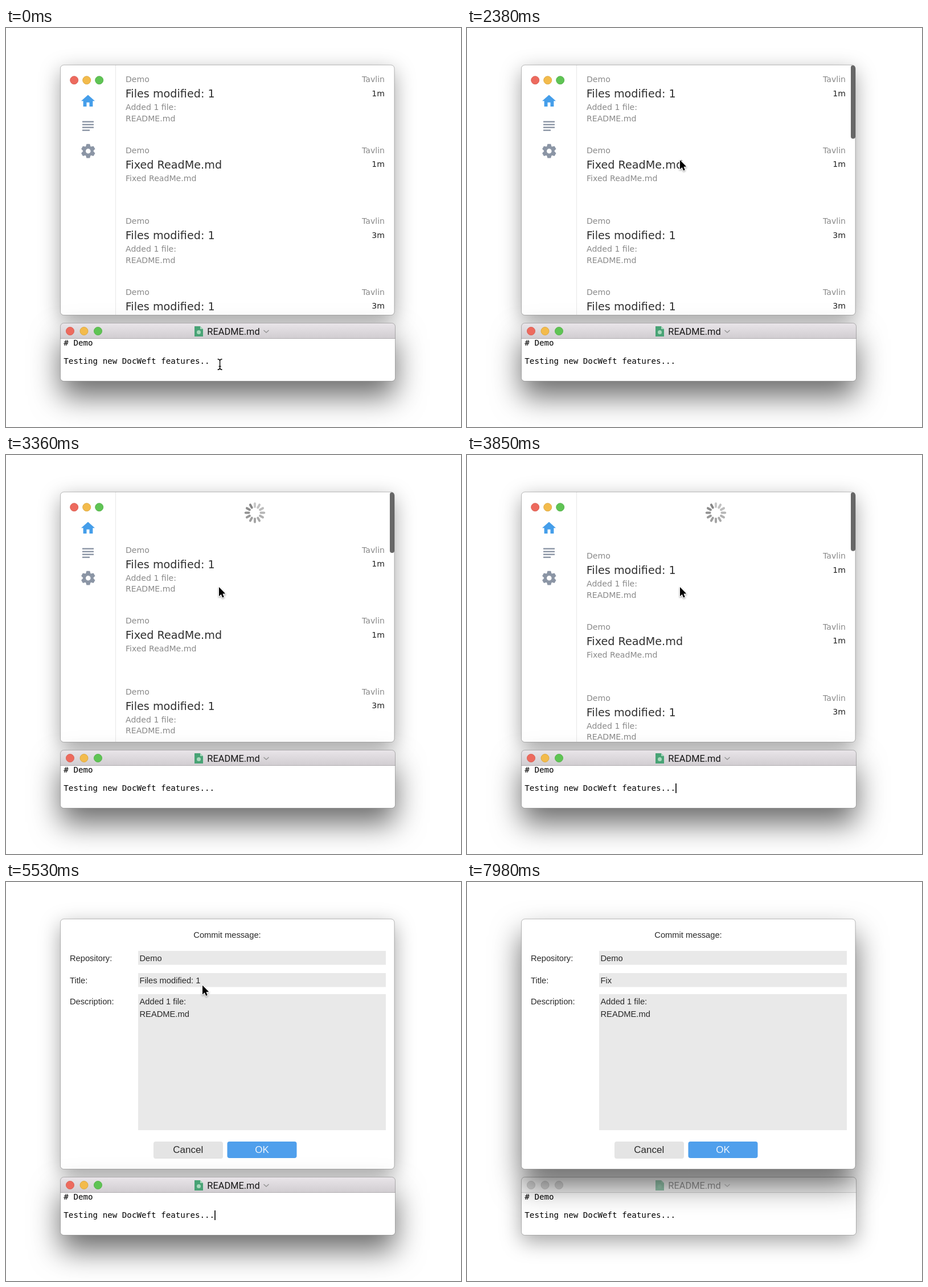
Write an HTML page with a canvas that moves like this. It is 799 px wide and 701 px high and loops after 8 s.

```html
<!DOCTYPE html>
<html lang="en">
<head>
<meta charset="utf-8">
<title>Commit dialog demo</title>
<style>
  html, body { margin: 0; width: 100%; height: 100%; overflow: hidden; background: #fff; }
  canvas { display: block; }
</style>
</head>
<body>
<canvas id="stage" width="799" height="701"></canvas>
<script>
const ctx = document.getElementById('stage').getContext('2d');
const LOOP = 8000, STEP = 70;
const LIST = '"DejaVu Sans", sans-serif';
const FORM = '"Liberation Sans", Arial, sans-serif';
const MONO = '14.2px "DejaVu Sans Mono", monospace';
const AUTHOR = 'Tavlin';

const ROWS = [
  ['Files modified: 1', ['Added 1 file:', 'README.md'], '1m'],
  ['Fixed ReadMe.md', ['Fixed ReadMe.md'], '1m'],
  ['Files modified: 1', ['Added 1 file:', 'README.md'], '3m'],
  ['Files modified: 1', ['Added 1 file:', 'README.md'], '3m']
];

// Key times in ms
const T = {
  type: 350, move: 840, moveEnd: 1610, bar: 2240, pull: 2450, pullEnd: 3850,
  dialog: 4340, aim: 5320, aimEnd: 5530, nudge: 5810, blur: 6090, select: 6440
};
const TITLE_KEYS = [[7350, 'F'], [7560, 'Fi'], [7770, 'Fix']];

const clamp = v => Math.max(0, Math.min(1, v));
const span = (t, a, b) => clamp((t - a) / (b - a));
const lerp = (a, b, u) => a + (b - a) * u;
const smooth = u => u * u * (3 - 2 * u);
const easeOut = u => 1 - (1 - u) * (1 - u);

function text(s, x, y, font, color, align = 'left') {
  ctx.font = font;
  ctx.fillStyle = color;
  ctx.textAlign = align;
  ctx.fillText(s, x, y);
}

function box(x, y, w, h, r) {
  ctx.beginPath();
  ctx.roundRect(x, y, w, h, r);
}

function fillBox(x, y, w, h, r, color) {
  box(x, y, w, h, r);
  ctx.fillStyle = color;
  ctx.fill();
}

function poly(points) {
  ctx.beginPath();
  points.forEach(([x, y]) => ctx.lineTo(x, y));
  ctx.closePath();
}

// Window frame with shadow; content is clipped to the rounded corners
function frame(x, y, w, h, active, content) {
  ctx.save();
  ctx.shadowColor = active ? 'rgba(0,0,0,.58)' : 'rgba(0,0,0,.37)';
  ctx.shadowBlur = active ? 51 : 36;
  ctx.shadowOffsetY = active ? 27 : 11;
  fillBox(x, y, w, h, 6, '#fff');
  ctx.restore();

  ctx.save();
  box(x, y, w, h, 6);
  ctx.clip();
  content();
  ctx.restore();

  box(x, y, w, h, 6);
  ctx.strokeStyle = 'rgba(0,0,0,.26)';
  ctx.lineWidth = 1;
  ctx.stroke();
}

function lights(x, y, gap, active) {
  const colors = active
    ? [['#ed6a5e', '#d8584c'], ['#f3bb4c', '#dba63c'], ['#5fc454', '#4eae43']]
    : Array(3).fill(['#d6d6d6', '#c4c4c4']);
  colors.forEach(([fill, edge], i) => {
    ctx.beginPath();
    ctx.arc(x + i * gap, y, 7, 0, 7);
    ctx.fillStyle = fill;
    ctx.fill();
    ctx.strokeStyle = edge;
    ctx.lineWidth = 0.9;
    ctx.stroke();
  });
}

function sidebar() {
  ctx.fillStyle = '#e8e8e8';
  ctx.fillRect(192, 65, 1, 440);
  lights(119.7, 91.7, 22, true);

  ctx.fillStyle = '#459eea';
  poly([[144, 117.5], [156, 128.3], [152.4, 128.3], [152.4, 138], [146.5, 138], [146.5, 130.8],
    [141.5, 130.8], [141.5, 138], [135.6, 138], [135.6, 128.3], [132, 128.3]]);
  ctx.fill();

  ctx.fillStyle = '#8b95a5';
  [20, 20, 20, 13].forEach((w, i) => ctx.fillRect(134, 163.5 + i * 5, w, 2.4));
  gear(144.3, 216.2);
}

function gear(x, y) {
  ctx.save();
  ctx.translate(x, y);
  ctx.strokeStyle = '#8b95a5';
  ctx.lineWidth = 5;
  ctx.beginPath();
  ctx.arc(0, 0, 6.8, 0, 7);
  ctx.stroke();
  for (let i = 0; i < 6; i++) {
    poly([[-4.2, -8], [-2.9, -12.4], [2.9, -12.4], [4.2, -8]]);
    ctx.fill();
    ctx.rotate(Math.PI / 3);
  }
  ctx.restore();
}

function row([title, lines, age], y) {
  const small = '14.1px ' + LIST, gray = '#898989';
  text('Demo', 210, y + 5, small, gray);
  text(AUTHOR, 665, y + 5, small, gray, 'right');
  text(title, 209.7, y + 32, '19.2px ' + LIST, '#303030');
  text(age, 665, y + 29.5, small, '#222', 'right');
  lines.forEach((s, i) => text(s, 210, y + 54 + i * 19.5, small, gray));
}

function spinner(pull) {
  const n = Math.min(12, Math.round(pull / 6.3));
  ctx.save();
  ctx.translate(437, 101.5);
  ctx.lineWidth = 4;
  ctx.lineCap = 'round';
  for (let i = 0; i < n; i++) {
    const g = Math.round(200 - 66 * i / Math.max(1, n - 1));
    ctx.strokeStyle = `rgb(${g},${g},${g})`;
    ctx.beginPath();
    ctx.moveTo(0, -10.5);
    ctx.lineTo(0, -16.2);
    ctx.stroke();
    ctx.rotate(Math.PI / 6);
  }
  ctx.restore();
}

function list(t) {
  const pull = 87.3 * easeOut(span(t, T.pull, T.pullEnd));
  sidebar();
  spinner(pull);
  ROWS.forEach((r, i) => row(r, 90 + i * 124.6 + pull));
  if (t >= T.bar) fillBox(674, 65.5, 8, 129 - pull * 0.295, 4, '#676767');
}

function dialog(t) {
  const font = '14.7px ' + FORM, ink = '#292929', big = '17px ' + FORM;
  const typed = TITLE_KEYS.filter(k => t >= k[0]).pop();

  text('Commit message:', 388.5, 97.7, font, ink, 'center');
  ['Repository:', 'Title:', 'Description:'].forEach((s, i) =>
    text(s, 112, [139.2, 178.2, 215][i], font, ink));

  ctx.fillStyle = '#e9e9e9';
  ctx.fillRect(232, 121, 435, 24.5);
  ctx.fillRect(232, 160, 435, 24.5);
  ctx.fillRect(232, 197, 435, 239);
  if (t >= T.select && !typed) {
    ctx.fillStyle = '#b2d5fb';
    ctx.fillRect(234, 161, 110, 22);
  }

  text('Demo', 234.5, 139.2, font, ink);
  text(typed ? typed[1] : 'Files modified: 1', 234.5, 178.2, font, ink);
  text('Added 1 file:', 234.5, 215, font, ink);
  text('README.md', 234.5, 237, font, ink);

  fillBox(259, 456, 122, 30, 4, '#e4e4e4');
  text('Cancel', 319.7, 476.3, big, ink, 'center');
  fillBox(388.5, 456, 122, 29, 4, '#4f9fec');
  text('OK', 449.5, 476.3, big, '#eef5fd', 'center');
}

function caretOn(t) {
  if (t < T.type || t >= T.blur) return false;
  return Math.abs(Math.floor((t - 2100) / 583)) % 2 === 1;
}

// Page with a folded corner and a plain dot
function fileIcon(x, y) {
  ctx.fillStyle = '#48a375';
  poly([[x, y], [x + 10, y], [x + 15, y + 5], [x + 15, y + 18], [x, y + 18]]);
  ctx.fill();
  ctx.fillStyle = '#a9d8bd';
  poly([[x + 10, y], [x + 15, y + 5], [x + 10, y + 5]]);
  ctx.fill();
  ctx.beginPath();
  ctx.arc(x + 7.5, y + 10.5, 3.5, 0, 7);
  ctx.fill();
}

function editor(t, active) {
  const bar = ctx.createLinearGradient(0, 519, 0, 545);
  bar.addColorStop(0, active ? '#e9e5e9' : '#f6f6f6');
  bar.addColorStop(1, active ? '#d1cdd1' : '#f6f6f6');
  ctx.fillStyle = bar;
  ctx.fillRect(95, 518, 589, 27);
  ctx.fillStyle = active ? '#b0adb0' : '#d2d2d2';
  ctx.fillRect(95, 545, 589, 1);
  lights(112.5, 532.5, 24.5, active);

  ctx.save();
  ctx.globalAlpha = active ? 1 : 0.55;
  fileIcon(331, 524);
  text('README.md', 399.5, 538.8, '16.4px Roboto, sans-serif', active ? '#161616' : '#444', 'center');
  ctx.strokeStyle = '#959595';
  ctx.lineWidth = 1.4;
  ctx.beginPath();
  ctx.moveTo(452.5, 531);
  ctx.lineTo(457, 535);
  ctx.lineTo(461.5, 531);
  ctx.stroke();
  ctx.restore();

  text('# Demo', 101.3, 558.3, MONO, '#000');
  text('Testing new DocWeft features..' + (t >= T.type ? '.' : ''), 101.3, 590.3, MONO, '#000');
  if (caretOn(t)) ctx.fillRect(366.2, 577, 1.6, 17);
}

function arrow(x, y) {
  ctx.save();
  ctx.translate(x, y);
  poly([[0, 0], [0, 16.2], [3.7, 12.8], [6.2, 18.4], [8.8, 17.3], [6.4, 11.8], [11.2, 11.6]]);
  ctx.shadowColor = 'rgba(0,0,0,.35)';
  ctx.shadowBlur = 3;
  ctx.shadowOffsetY = 1.5;
  ctx.lineJoin = 'round';
  ctx.lineWidth = 2.2;
  ctx.strokeStyle = '#fff';
  ctx.stroke();
  ctx.shadowColor = 'transparent';
  ctx.fillStyle = '#000';
  ctx.fill();
  ctx.restore();
}

function beam(x, y) {
  ctx.save();
  ctx.translate(x, y);
  ctx.beginPath();
  for (const s of [-1, 1]) {
    ctx.moveTo(-4, 9.3 * s);
    ctx.quadraticCurveTo(-0.5, 9.3 * s, 0, 6.5 * s);
    ctx.quadraticCurveTo(0.5, 9.3 * s, 4, 9.3 * s);
  }
  ctx.moveTo(0, -7);
  ctx.lineTo(0, 7);
  ctx.moveTo(-2, 3.5);
  ctx.lineTo(2, 3.5);
  ctx.lineWidth = 3;
  ctx.strokeStyle = 'rgba(255,255,255,.7)';
  ctx.stroke();
  ctx.lineWidth = 1.5;
  ctx.strokeStyle = '#111';
  ctx.stroke();
  ctx.restore();
}

// The pointer hides while keys are pressed
function pointer(t) {
  if (t < T.type) return beam(375.6, 591);
  if (t < T.move || t >= TITLE_KEYS[0][0]) return;
  if (t >= T.select) return beam(346.5, 177);
  if (t < T.aim) {
    const u = smooth(span(t, T.move - STEP, T.moveEnd));
    const x = lerp(376, 374, u) + 30 * Math.sin(Math.PI * u);
    const y = lerp(584, 232, u);
    return y > 546 ? beam(x, y) : arrow(x, y);
  }
  const u = smooth(span(t, T.aim - STEP, T.aimEnd));
  const v = span(t, T.nudge - STEP, T.nudge + STEP);
  arrow(lerp(374, 345, u) + 1.5 * v, lerp(232, 181.5, u) - 5 * v);
}

function draw(t) {
  const lowerActive = t < T.blur, upperActive = t >= T.select;
  const upper = () => frame(95.5, 65, 586.5, 439.5, upperActive,
    () => t < T.dialog ? list(t) : dialog(t));
  const lower = () => frame(95.5, 518.5, 588, 102, lowerActive,
    () => editor(t, lowerActive));

  ctx.fillStyle = '#fff';
  ctx.fillRect(0, 0, 799, 701);
  (lowerActive ? [upper, lower] : [lower, upper]).forEach(paint => paint());
  pointer(t);
}

function tick() {
  const t = performance.now() % LOOP;
  draw(Math.floor(t / STEP) * STEP);
  requestAnimationFrame(tick);
}
tick();
</script>
</body>
</html>
```
